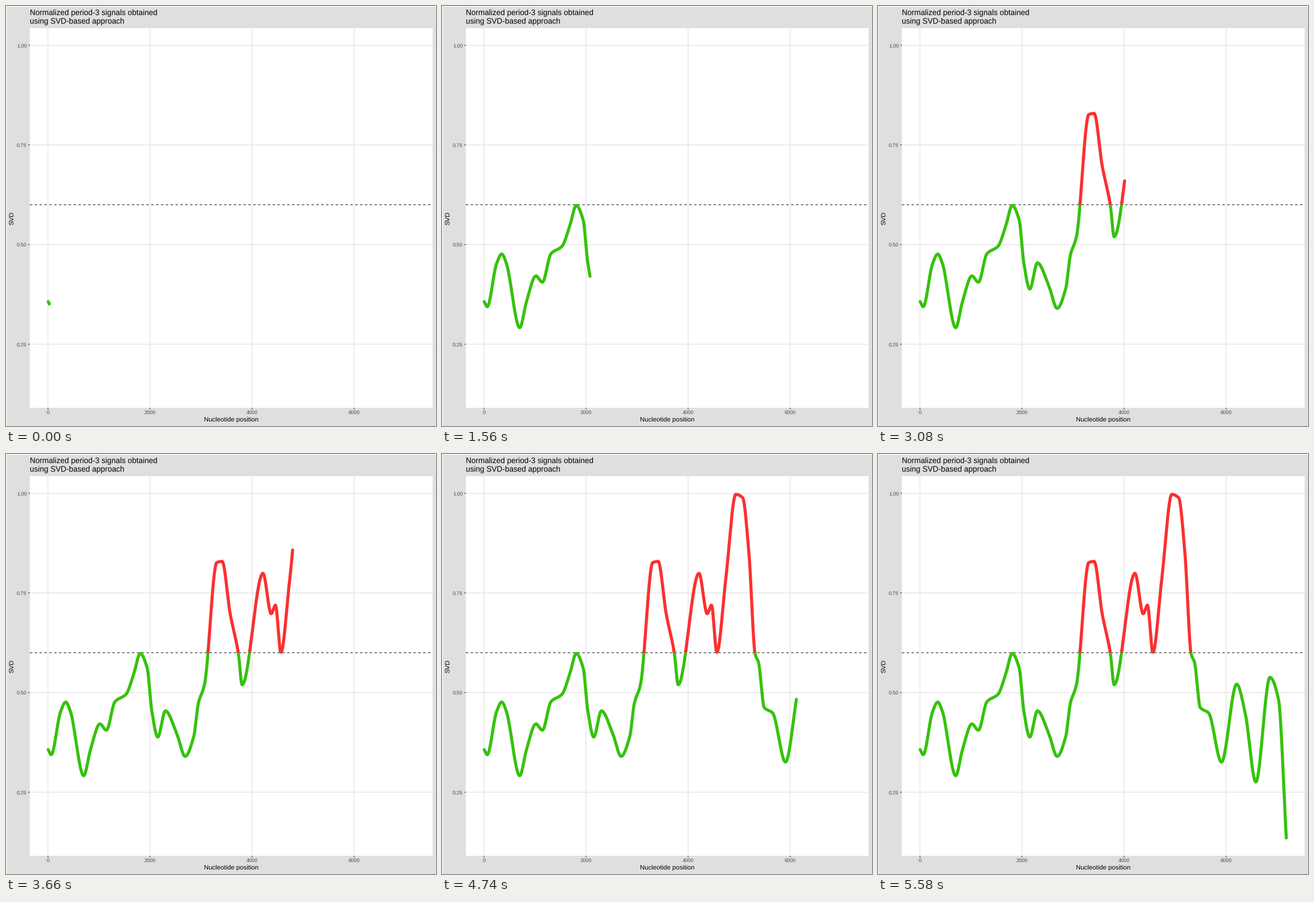
Animation of 758 by 739 pixels, one loop 5600 ms. Source, as a matplotlib script:

```python
import matplotlib.pyplot as plt
import numpy as np
from matplotlib.animation import FuncAnimation
from matplotlib.patches import Rectangle

W, H, DPI = 758, 739, 64
PX = 72 / DPI  # points per pixel
GREEN, RED = "#36C20E", "#FB3030"
LEFT, RIGHT, TOP, BOTTOM = 42, 752, 39, 707

plt.rcParams.update({"font.family": "Liberation Sans", "text.hinting": "none"})

# Main turns of the signal, in stage pixels; easing fills in the rest
KEYS = np.array([
    (74.3, 520), (79.7, 529), (96, 454), (105.3, 436.5), (113.5, 453),
    (137, 566), (149, 520), (165.5, 475), (177, 486), (192, 436),
    (211.7, 422.5), (225.5, 386), (236.5, 351), (249, 377), (257, 452),
    (267.5, 498), (281, 452), (301, 492), (315.8, 532), (331, 497),
    (339, 439), (350, 405), (371.5, 191), (381, 189), (395, 280),
    (409.5, 350), (416.3, 406), (453, 210), (467.5, 281), (475, 266),
    (484.6, 349), (500, 222), (518, 71), (530, 77), (541, 174),
    (552, 352), (558, 367), (568, 446), (583, 456), (605.5, 542),
    (632.3, 405), (647.5, 457), (666, 577), (691, 393), (706, 432),
    (719.7, 675.5),
])


def ease(x, keys):
    """Cubic interpolation that is level at every peak and dip."""
    kx, ky = keys.T
    h = np.diff(kx)
    d = np.diff(ky) / h
    a, b = d[:-1], d[1:]
    same = a * b > 0
    inner = np.where(same, 2 * a * b / np.where(same, a + b, 1), 0)
    m = np.concatenate(([d[0]], inner, [d[-1]]))
    i = np.clip(np.searchsorted(kx, x, side="right") - 1, 0, len(h) - 1)
    t = (x - kx[i]) / h[i]
    s = t * t * (3 - 2 * t)
    bend = t * (1 - t) ** 2 * m[i] - t * t * (1 - t) * m[i + 1]
    return ky[i] + s * (ky[i + 1] - ky[i]) + h[i] * bend


def x_pos(nt):
    return 74 + nt * 0.08995


def y_pos(v):
    return 69.2 + (1 - v) * 701.2


fig = plt.figure(figsize=(W / DPI, H / DPI), dpi=DPI, facecolor="#DFDFDF")
ax = fig.add_axes([0, 0, 1, 1])
ax.set(xlim=(0, W), ylim=(H, 0))
ax.axis("off")


def line(xs, ys, color, width=1.07, cap="butt", **kw):
    return ax.plot(xs, ys, color=color, lw=width * PX, snap=False,
                   solid_capstyle=cap, solid_joinstyle="round", **kw)[0]


def text(x, y, s, size, color="black", **kw):
    ax.text(x, y, s, size=size * PX, color=color, va="baseline", **kw)


ax.add_patch(Rectangle((0, 0), W, H, fill=False, ec="white", lw=1.4 * PX))
ax.add_patch(Rectangle((LEFT, TOP), RIGHT - LEFT, BOTTOM - TOP,
                       fc="white", lw=0))

for v in (0.25, 0.5, 0.75, 1):
    y = y_pos(v)
    line([LEFT, RIGHT], [y, y], "#DEDEDE")
    line([LEFT - 2.8, LEFT], [y, y], "#333333")
    text(36.8, y + 3.5, f"{v:.2f}", 9.1, "#4D4D4D", ha="right")

for nt in range(0, 8000, 2000):
    x = x_pos(nt)
    line([x, x], [TOP, BOTTOM], "#DEDEDE")
    line([x, x], [BOTTOM, BOTTOM + 2.8], "#333333")
    text(x, 718.3, str(nt), 9.1, "#4D4D4D", ha="center")

limit = y_pos(0.6)
line([LEFT, RIGHT], [limit, limit], "#1A1A1A", ls=(0, (4, 4)),
     dash_capstyle="butt")

text(42, 16.4, "Normalized period-3 signals obtained", 13.6)
text(42, 30.6, "using SVD-based approach", 13.6)
text(397, 731.3, "Nucleotide position", 11.4, ha="center")
text(13.8, 373, "SVD", 11.4, ha="center", rotation=90, rotation_mode="anchor")

low = line([], [], GREEN, 5.4, "round")
high = line([], [], RED, 5.4, "round")

X0, X1 = KEYS[0, 0], KEYS[-1, 0]
GRID = np.arange(X0, X1, 0.1)


def update(tick):
    # Steps last 20, 100 and 20 ms in turn
    cycle, r = divmod(tick, 7)
    step = 3 * cycle + (r > 0) + (r > 5)
    tip = min(76.3 + 5.43 * step, X1)
    x = np.append(GRID[GRID < tip], tip)
    y = ease(x, KEYS)
    low.set_data(x, np.where(y > limit - 4, y, np.nan))
    high.set_data(x, np.where(y < limit - 2, y, np.nan))
    return low, high


anim = FuncAnimation(fig, update, frames=280, interval=20, repeat=True,
                     repeat_delay=0, blit=True)
plt.show()
```
